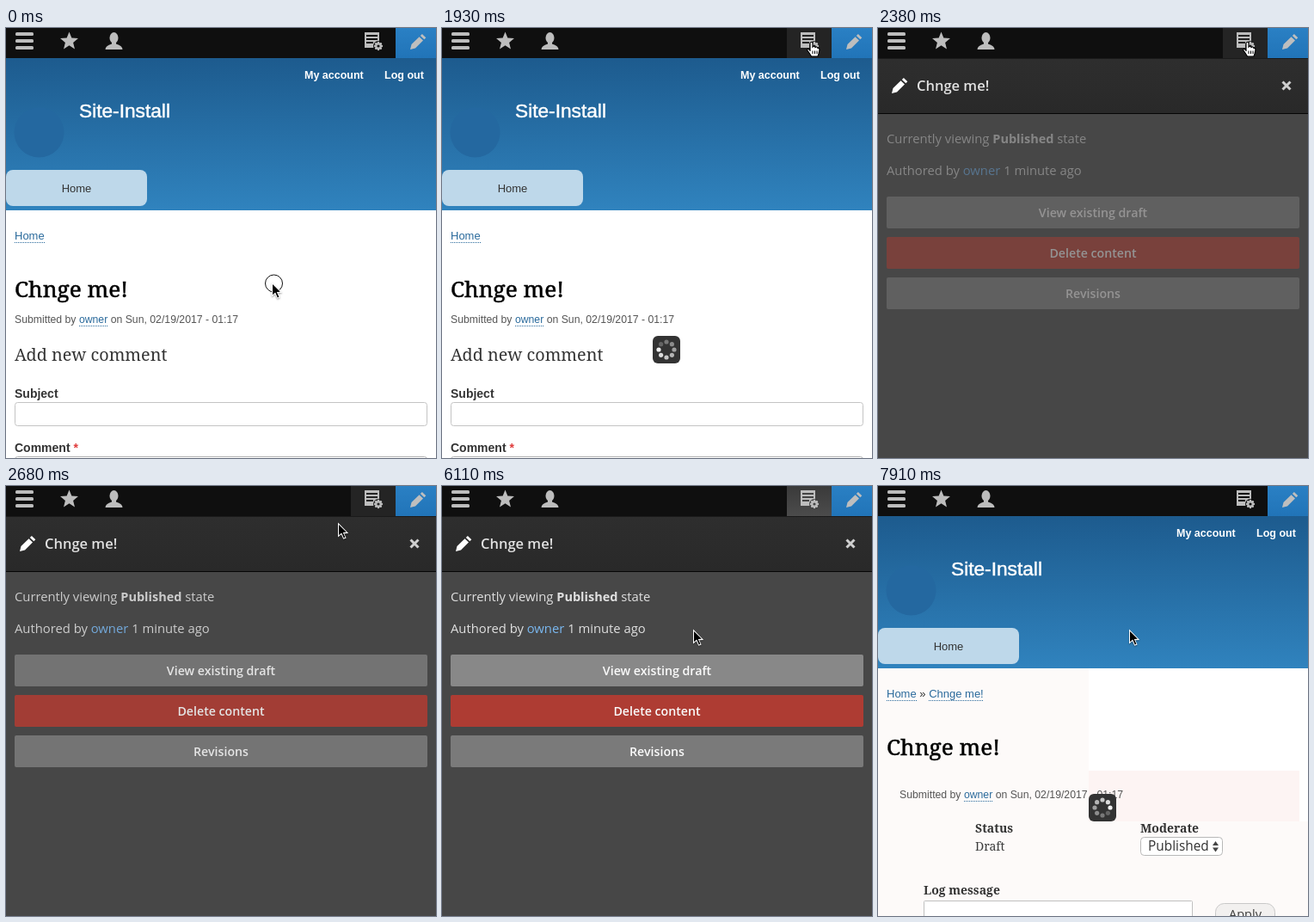
An HTML page with a canvas for the animation above (8000 ms loop, 500 by 500 pixels).

```html
<!DOCTYPE html>
<html lang="en">
<head>
<meta charset="utf-8">
<title>Site-Install</title>
<style>
html, body { margin: 0; width: 100%; height: 100%; overflow: hidden; background: #fff; }
canvas { display: block; width: 500px; height: 500px; }
</style>
</head>
<body>
<canvas id="stage" width="500" height="500"></canvas>
<script>
const ctx = document.getElementById('stage').getContext('2d');
const LOOP = 8000;
const SANS = '"Liberation Sans", Arial, sans-serif';
const SERIF = '"Noto Serif", Georgia, serif';
const UI = '"Open Sans", "Noto Sans", sans-serif';
const USER = 'owner';
const LINK = '#2a6a9c';

// ---------- helpers ----------
function rect(x, y, w, h, fill) {
  ctx.fillStyle = fill;
  ctx.fillRect(x, y, w, h);
}

function round(x, y, w, h, r, fill, stroke) {
  ctx.beginPath();
  ctx.roundRect(x, y, w, h, r);
  if (fill) { ctx.fillStyle = fill; ctx.fill(); }
  if (stroke) { ctx.strokeStyle = stroke; ctx.lineWidth = 1; ctx.stroke(); }
}

function fade(y0, y1, top, bottom) {
  const g = ctx.createLinearGradient(0, y0, 0, y1);
  g.addColorStop(0, top);
  g.addColorStop(1, bottom);
  return g;
}

function disc(x, y, r, fill) {
  ctx.beginPath();
  ctx.arc(x, y, r, 0, Math.PI * 2);
  ctx.fillStyle = fill;
  ctx.fill();
}

// Draws text and returns the x where it ends.
function text(s, x, y, font, color, align = 'left') {
  ctx.font = font;
  ctx.fillStyle = color;
  ctx.textAlign = align;
  ctx.fillText(s, x, y);
  return x + ctx.measureText(s).width;
}

// Text with a thin outline, for a slightly heavier weight.
function heavyText(s, x, y, font, color) {
  text(s, x, y, font, color);
  ctx.strokeStyle = color;
  ctx.lineWidth = 0.5;
  ctx.strokeText(s, x, y);
}

function link(s, x, y, font) {
  const end = text(s, x, y, font, LINK);
  ctx.fillStyle = LINK;
  for (let i = Math.round(x); i < end; i += 2) ctx.fillRect(i, y + 3, 1, 1);
  return end;
}

function poly(points, x, y, fill) {
  ctx.beginPath();
  points.forEach(([px, py]) => ctx.lineTo(x + px, y + py));
  ctx.closePath();
  ctx.fillStyle = fill;
  ctx.fill();
}

function mix(a, b, p) {
  return 'rgb(' + a.map((v, i) => Math.round(v + (b[i] - v) * p)).join(',') + ')';
}

// ---------- icons ----------
function pencil(x, y, color) {
  poly([[0, 18], [1.5, 12], [10.5, 3.2], [15, 7.6], [6, 16.4]], x, y, color);
  poly([[11.8, 2], [13.9, 0], [18.3, 4.3], [16.3, 6.3]], x, y, color);
}

function star(cx, cy, r, color) {
  const pts = [];
  for (let i = 0; i < 10; i++) {
    const a = i * Math.PI / 5 - Math.PI / 2, d = i % 2 ? r * 0.44 : r;
    pts.push([Math.cos(a) * d, Math.sin(a) * d]);
  }
  poly(pts, cx, cy, color);
}

function person(cx, y, color) {
  ctx.beginPath();
  ctx.ellipse(cx, y + 6.5, 5, 6.5, 0, 0, Math.PI * 2);
  ctx.fillStyle = color;
  ctx.fill();
  ctx.fillRect(cx - 2.5, y + 10, 5, 5);
  ctx.beginPath();
  ctx.moveTo(cx - 10, y + 20);
  ctx.quadraticCurveTo(cx - 10, y + 15.5, cx - 2.5, y + 13.5);
  ctx.lineTo(cx + 2.5, y + 13.5);
  ctx.quadraticCurveTo(cx + 10, y + 15.5, cx + 10, y + 20);
  ctx.fill();
}

function pageGear(color, back) {
  rect(417, 5, 17, 18, color);
  [8, 12, 16].forEach((y, i) => rect(419, y, i < 2 ? 13 : 8, 2, back));
  disc(433, 21, 6, back);
  for (let i = 0; i < 8; i++) {
    const a = i * Math.PI / 4;
    disc(433 + Math.cos(a) * 4, 21 + Math.sin(a) * 4, 1.2, color);
  }
  disc(433, 21, 3.9, color);
  disc(433, 21, 1.6, back);
}

function cross(cx, cy, r, color) {
  ctx.strokeStyle = color;
  ctx.lineWidth = 3;
  ctx.beginPath();
  ctx.moveTo(cx - r, cy - r); ctx.lineTo(cx + r, cy + r);
  ctx.moveTo(cx + r, cy - r); ctx.lineTo(cx - r, cy + r);
  ctx.stroke();
}

function spinner(step) {
  round(245, 358, 32, 32, 6, '#333');
  for (let i = 0; i < 8; i++) {
    const a = i * Math.PI / 4 - Math.PI / 2;
    const age = (step - i + 80) % 8;
    const v = Math.round(240 - age * 20);
    disc(261 + Math.cos(a) * 9, 374 + Math.sin(a) * 9, 2.6, `rgb(${v},${v},${v})`);
  }
}

// ---------- pointer ----------
const INTERVAL = 148;
const MOVES = [
  { at: 150, steps: 5, to: [430, 16] },
  { at: 2530, steps: 2, to: [387, 44] },
  { at: 2820, steps: 3, to: [267, 204] },
  { at: 5210, steps: 7, to: [293, 168] }
];

function pointerAt(t) {
  let pos = [310, 297];
  for (const m of MOVES) {
    if (t < m.at) break;
    const k = Math.min(1, (Math.floor((t - m.at) / INTERVAL) + 1) / m.steps);
    const e = k * k * (3 - 2 * k);
    pos = pos.map((v, i) => v + (m.to[i] - v) * e);
  }
  return pos.map(Math.round);
}

function arrow(x, y) {
  ctx.save();
  ctx.shadowColor = 'rgba(0,0,0,.4)';
  ctx.shadowBlur = 2;
  ctx.shadowOffsetY = 1;
  poly([[-1, -1.5], [-1, 15.5], [2.8, 12.2], [5.3, 17.8], [8.6, 16.4], [6.2, 11.2], [11.2, 11]], x, y, '#fff');
  ctx.restore();
  poly([[0, 1], [0, 13.2], [3.2, 10.4], [5.8, 16.4], [7.4, 15.7], [4.8, 10], [8.8, 9.8]], x, y, '#000');
}

function hand(x, y) {
  ctx.save();
  ctx.translate(x, y);
  ctx.beginPath();
  ctx.moveTo(-2, 11);
  ctx.lineTo(-2, 1.5);
  ctx.quadraticCurveTo(-0.5, -1, 1, 1.5);
  ctx.lineTo(1, 6);
  ctx.quadraticCurveTo(3, 4, 4, 6.5);
  ctx.quadraticCurveTo(6, 5, 7, 7.5);
  ctx.quadraticCurveTo(9, 7, 9, 9.5);
  ctx.lineTo(8, 14);
  ctx.lineTo(7, 17);
  ctx.lineTo(-0.5, 17);
  ctx.lineTo(-3, 13);
  ctx.lineTo(-5.5, 9.5);
  ctx.quadraticCurveTo(-4.5, 7, -2, 10);
  ctx.closePath();
  ctx.fillStyle = '#fff';
  ctx.strokeStyle = '#000';
  ctx.lineWidth = 1.2;
  ctx.fill();
  ctx.stroke();
  ctx.beginPath();
  for (const i of [1, 3.5, 6]) { ctx.moveTo(i, 10.5); ctx.lineTo(i, 14); }
  ctx.lineWidth = 1;
  ctx.stroke();
  ctx.restore();
}

function pointer(t, inTray) {
  const [x, y] = pointerAt(t);
  if (t < 150) {
    ctx.strokeStyle = '#111';
    ctx.lineWidth = 1;
    ctx.beginPath();
    ctx.arc(311.5, 297, 10, 0, Math.PI * 2);
    ctx.stroke();
  }
  const overTab = y < 36 && x > 400 && x < 453;
  const overButton = inTray && y > 196 && y < 233;
  (overTab || overButton ? hand : arrow)(x, y);
}

// ---------- scenes ----------
function toolbar(t, inTray) {
  rect(0, 0, 500, 35, '#0f0f0f');
  const hover = t >= 740 && t < 6860;
  const active = inTray && t >= 2970;
  if (hover) rect(401, 0, 52, 35, active ? fade(0, 35, '#3a3a3a', '#4c4c4c') : '#242424');
  rect(453, 0, 47, 35, fade(0, 35, '#2a80c4', '#2174b8'));
  const c = '#bdbdbd';
  [5, 13, 21].forEach(y => round(11, y, 21, 4, 1.5, c));
  star(73.5, 15.5, 11, c);
  person(125.5, 5, c);
  pageGear(c, active ? '#444' : hover ? '#242424' : '#0f0f0f');
  pencil(470, 7, '#bebebe');
}

function siteHeader() {
  rect(0, 35, 500, 177, fade(35, 212, '#1d5b8e', '#3083be'));
  const bold = 'bold 12.5px ' + SANS;
  text('My account', 347, 59, bold, '#fff');
  text('Log out', 440, 59, bold, '#fff');
  heavyText('Site-Install', 85, 104, '22.7px ' + SANS, '#fff');
  disc(38.5, 121.5, 29, '#2468a0');
  round(0, 165, 164, 42, 8, '#bed8ea');
  text('Home', 82, 191, '13px ' + SANS, '#333', 'center');
}

function byline(x, y) {
  const font = '12.25px ' + SANS, gray = '#555';
  let end = text('Submitted by ', x, y, font, gray);
  end = link(USER, end, y, font);
  text(' on Sun, 02/19/2017 - 01:17', end, y, font, gray);
}

function heading() {
  heavyText('Chnge me!', 10, 313, '26.2px ' + SERIF, '#000');
}

function livePage() {
  rect(0, 212, 500, 288, '#fff');
  siteHeader();
  link('Home', 10, 246, '13px ' + SANS);
  heading();
  byline(10, 343);
  text('Add new comment', 10, 387, '19.8px ' + SERIF, '#333');
  const bold = 'bold 14px ' + SANS;
  text('Subject', 10, 430, bold, '#333');
  round(10.5, 435.5, 479, 27, 3, '#fff', '#c4c4c4');
  const end = text('Comment ', 10, 493, bold, '#333');
  text('*', end, 493, bold, '#e03c3c');
  round(10.5, 498.5, 479, 40, 3, '#fff', '#b4b4b4');
}

function draftPage(t) {
  rect(0, 212, 500, 288, '#fdfaf9');
  if (t >= 7160) {
    rect(245, 212, 255, 178, '#fff');
    rect(245, 331, 245, 59, '#fdf4f3');
  }
  siteHeader();
  const font = '13px ' + SANS;
  let end = link('Home', 10, 246, font);
  end = text(' » ', end, 246, font, '#333');
  link('Chnge me!', end, 246, font);
  heading();
  byline(25, 363);
  const bold = 'bold 14px ' + SERIF;
  text('Status', 113, 403, bold, '#333');
  text('Draft', 113, 424, '14px ' + SERIF, '#3b3b3b');
  text('Moderate', 305, 403, bold, '#333');
  round(305.5, 408.5, 95, 21, 4, '#fff', '#b8b8b8');
  text('Published', 314, 424, '15.4px ' + UI, '#333');
  poly([[0, 5], [3.5, 0], [7, 5]], 389, 413, '#444');
  poly([[0, 0], [3.5, 5], [7, 0]], 389, 420.5, '#444');
  text('Log message', 53, 475, bold, '#333');
  round(53.5, 482.5, 312, 40, 1, '#fff', '#c0c0c0');
  round(392.5, 485.5, 69, 28, 10, '#f2f0ef', '#c8c8c8');
  text('Apply', 427, 503, '14.5px ' + UI, '#3b3b3b', 'center');
}

const FADE = [0, 0.22, 0.45, 0.7, 0.88, 0.95];

function tray(t) {
  const step = Math.floor((t - 2080) / INTERVAL);
  const p = step < FADE.length ? FADE[step] : 1;
  rect(0, 35, 500, 465, '#474747');
  rect(0, 36, 500, 63, fade(36, 99, '#2e2e2e', '#292929'));
  rect(0, 35, 500, 1, '#1a1a1a');
  rect(0, 99, 500, 1, '#050505');
  pencil(16, 58, '#fff');
  text('Chnge me!', 45, 73, '600 16.5px ' + UI, '#e2e2e2');
  cross(475, 67, 4.5, '#cfcfcf');

  const body = '14.8px ' + UI;
  const ink = mix([61, 61, 61], [224, 224, 224], p);
  let end = text('Currently viewing ', 10, 134, body, ink);
  end = text('Published', end, 134, 'bold 14.5px ' + UI, ink);
  text(' state', end, 134, body, ink);
  end = text('Authored by ', 10, 171, body, ink);
  end = text(USER, end, 171, body, mix([61, 63, 65], [122, 184, 240], p));
  text(' 1 minute ago', end, 171, body, ink);

  const view = t >= 3120 ? [136, 136, 136] : [121, 121, 121];
  const rows = [
    ['View existing draft', 196, [75, 75, 75], view],
    ['Delete content', 243, [78, 69, 68], [174, 60, 51]],
    ['Revisions', 290, [75, 75, 75], [122, 122, 122]]
  ];
  rows.forEach(([label, y, from, to]) => {
    round(10, y, 480, 37, 2, mix(from, to, p));
    text(label, 250, y + 24, '600 14.2px ' + UI, mix([65, 63, 63], [250, 250, 250], p), 'center');
  });
}

function draw(t) {
  const inTray = t >= 2080 && t < 6860;
  if (inTray) tray(t);
  else if (t < 2080) livePage();
  else draftPage(t);
  toolbar(t, inTray);
  if (t >= 1030 && t < 2080) spinner(Math.floor((t - 1030) / 150));
  if (t >= 7160) spinner(Math.max(0, Math.floor((t - 7310) / 150)) + 6);
  pointer(t, inTray);
}

const start = performance.now();
function tick() {
  draw((performance.now() - start) % LOOP);
  requestAnimationFrame(tick);
}
tick();
</script>
</body>
</html>
```
